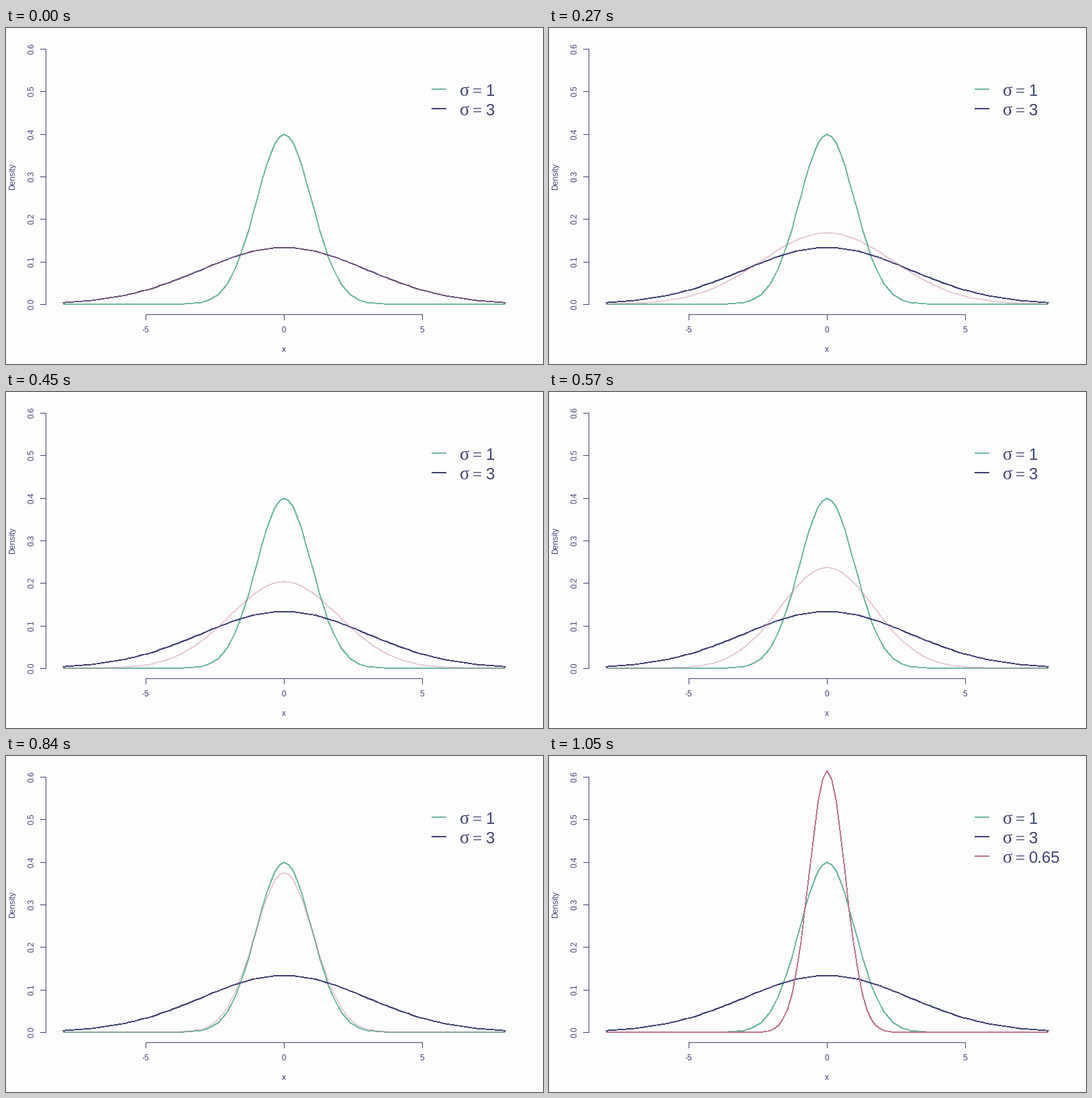
Recreate the animation shown at these times as a matplotlib script. Size 800x500 px, loop 1.08 s.

```python
import matplotlib.pyplot as plt
import numpy as np
from matplotlib.animation import FuncAnimation

W, H, DPI = 800, 500, 100
PX = 72 / DPI
FRAMES, STEP = 36, 30

GREEN, NAVY, PINK = "#70BA9C", "#3E4270", "#BC738F"
FAINT = 0.35

plt.rcParams["font.family"] = "Liberation Sans"
plt.rcParams["text.hinting"] = "native"

fig = plt.figure(figsize=(W / DPI, H / DPI), dpi=DPI, facecolor="#FDFDFD")
ax = fig.add_axes([0, 0, 1, 1])
ax.set(xlim=(0, W), ylim=(H, 0))
ax.axis("off")

x = np.linspace(-8, 8, 101)


def to_x(v):
    return np.round(414.4 + 41.2 * v)


def to_y(d):
    return np.round(411 - 633.3 * d)


def density(sigma):
    return np.exp(-0.5 * (x / sigma) ** 2) / (sigma * np.sqrt(2 * np.pi))


def curve(sigma, color):
    # Without antialiasing every touched pixel is filled: this is two pixels wide.
    return ax.plot(to_x(x), to_y(density(sigma)), color=color, lw=0.8 * PX,
                   antialiased=False, snap=False, solid_capstyle="butt")[0]


def rule(x0, y0, x1, y1, color=NAVY, width=1):
    return ax.plot([x0, x1], [y0, y1], color=color, lw=width * PX,
                   snap=False, solid_capstyle="butt")[0]


def label(px, py, s, size=12, ha="center", **kw):
    return ax.text(px, py, s, fontsize=size * PX, color=NAVY, ha=ha,
                   va="baseline", rotation_mode="anchor", **kw)


def legend_row(y, value, color):
    serif = dict(ha="left", family="Liberation Serif")
    return [rule(634, y, 656, y, color, 2),
            label(676, y + 10, "σ", 27, **serif),
            label(695, y + 10, "=", 25, **serif),
            label(714.5, y + 10, value, 24, ha="left")]


# Axes
rule(59.5, 31, 59.5, 412)
for i in range(7):
    y = to_y(i / 10) + 0.5
    rule(51, y, 60, y)
    label(42, y - 1, f"{i / 10:.1f}", rotation=90)
rule(208, 426.5, 621, 426.5)
for v in (-5, 0, 5):
    px = to_x(v) + 0.5
    rule(px, 426, px, 435)
    label(px - 0.8, 453, str(v))
label(414, 482, "x")
label(13, 221, "Density", rotation=90)

# Curves and legend
curve(1, GREEN)
curve(3, NAVY)
moving = curve(3, PINK)
legend_row(91, "1", GREEN)
legend_row(120, "3", NAVY)
last_row = legend_row(149, "0.65", PINK)


def update(i):
    # Sigma shrinks evenly, then the final curve is held in full colour.
    done = i == FRAMES - 1
    sigma = 3 - 2.35 * min(i / (FRAMES - 2), 1)
    moving.set_ydata(to_y(density(sigma)))
    moving.set_alpha(1 if done else FAINT)
    for part in last_row:
        part.set_visible(done)
    return [moving, *last_row]


anim = FuncAnimation(fig, update, frames=FRAMES, interval=STEP,
                     init_func=lambda: update(0), repeat=True, repeat_delay=0)
plt.show()
```
